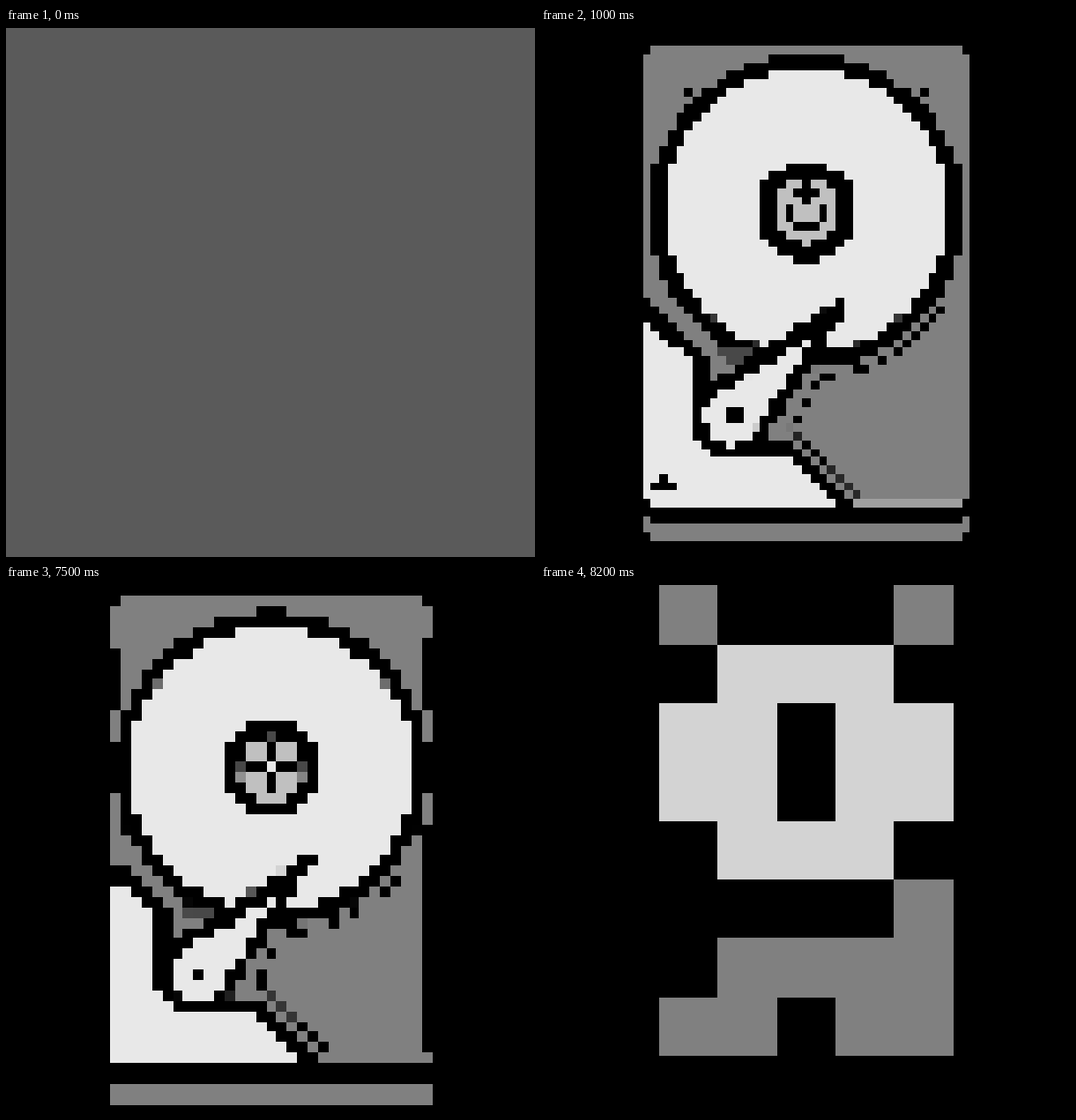
Animation of 600x600 px, one loop 8300 ms. Source, as an HTML page with a canvas:

```html
<!DOCTYPE html>
<html lang="en">
<head>
<meta charset="utf-8">
<title>Pixelated hard drive</title>
<style>
html, body { margin: 0; width: 100%; height: 100%; overflow: hidden; background: #000; }
canvas { display: block; width: 600px; height: 600px; }
</style>
</head>
<body>
<canvas id="stage" width="600" height="600"></canvas>
<script>
const SIZE = 600, SCALE = 4;
const CX = 300, CY = 207;
const GREY = '#808080';
const stage = document.getElementById('stage').getContext('2d');
const sceneCanvas = document.createElement('canvas');
sceneCanvas.width = sceneCanvas.height = SIZE * SCALE;
const scene = sceneCanvas.getContext('2d', { willReadFrequently: true });
scene.scale(SCALE, SCALE);

function rect(color, x, y, w, h) {
  scene.fillStyle = color;
  scene.fillRect(x, y, w, h);
}

const square = (color, x, y, size) => rect(color, x - size / 2, y - size / 2, size, size);

function plus(x, y, arm, width) {
  rect('#000', x - arm, y - width / 2, 2 * arm, width);
  rect('#000', x - width / 2, y - arm, width, 2 * arm);
}

function fill(color) {
  scene.fillStyle = color;
  scene.fill();
}

function stroke(width, join = 'miter') {
  scene.strokeStyle = '#000';
  scene.lineWidth = width;
  scene.lineJoin = join;
  scene.stroke();
}

function path(...points) {
  scene.beginPath();
  points.forEach(([x, y]) => scene.lineTo(x, y));
}

function disc(color, r) {
  scene.beginPath();
  scene.arc(CX, CY, r, 0, 2 * Math.PI);
  fill(color);
}

// Box with all four corners cut off
function cutBox(color, x0, y0, x1, y1, cut) {
  path([x0 + cut, y0], [x1 - cut, y0], [x1, y0 + cut], [x1, y1 - cut],
    [x1 - cut, y1], [x0 + cut, y1], [x0, y1 - cut], [x0, y0 + cut]);
  fill(color);
}

// Round pivot tapering to a point
function teardrop(color, r, tipX, tipY, outline = 0) {
  const x = 214, y = 442;
  const angle = Math.atan2(tipY - y, tipX - x);
  const open = Math.acos(r / Math.hypot(tipX - x, tipY - y));
  scene.beginPath();
  scene.arc(x, y, r, angle + open, angle - open + 2 * Math.PI);
  scene.lineTo(tipX, tipY);
  scene.closePath();
  if (outline) stroke(outline, 'round');
  fill(color);
}

// Recessed panel beside the disc: solid in coarse views, thin lines in fine ones
function drawPanel(n) {
  const solid = n < 36;
  const inset = solid ? 4 : 0;
  const right = 476 - 4 * inset, bottom = 532 - 5 * inset;
  path([right, 272 + 18 * inset], [right, bottom], [364 + 2.5 * inset, bottom],
    [284 + 7.5 * inset, 452], [312 + 7.5 * inset, 398]);
  scene.arc(CX, CY, 189 + 4 * inset, 1.48, 0.6, true);
  if (solid) return fill('#000');
  stroke(5);
  rect('#a0a0a0', 352, 537, 128, 5);
  rect('#000', 121.5, 72, 5, 72);
  rect('#000', 473.5, 64, 5, 80);
  path([122, 290], [206, 374]);
  stroke(3);
  for (const angle of [-Math.PI / 4, -3 * Math.PI / 4]) {
    scene.beginPath();
    scene.arc(CX, CY, 189, angle - 0.05, angle + 0.05);
    stroke(5);
  }
}

function drawHub(n, white, grow) {
  disc('#000', 57 + grow);
  disc(n > 21 ? '#c0c0c0' : '#929292', 37 - 2 * grow);
  if (n > 60) {
    plus(CX, 188, 12, 8);
    square('#000', CX - 20, 208, 16);
    square('#000', CX + 20, 208, 16);
    rect('#000', CX - 12, 216, 24, 16);
  } else if (n > 21) {
    plus(CX, CY, 28, 12);
    square(white, CX, CY, 12);
    for (const [dx, dy] of [[0, -1], [-1, 0], [1, 0]]) {
      square('#484848', CX + 39 * dx, CY + 39 * dy, 12);
    }
  }
}

function drawDrive(n) {
  const coarse = n < 15;
  const grow = Math.min(8, Math.max(0, (SIZE / n - 14) * 0.275)); // outlines thicken with the cells
  const white = coarse ? '#d3d3d3' : n < 75 ? '#e8e8e8' : '#eeeeee';

  rect('#000', 0, 0, SIZE, SIZE);
  cutBox(GREY, 112, 16, 488, 544, 17);
  if (!coarse) drawPanel(n);

  disc('#000', 178.8 + grow);
  disc(white, 160.6 - grow);
  drawHub(n, white, grow);
  path([200, 366], [238, 366], [222, 384]);
  fill('#484848');

  // Base plate
  path([112, 326], [168, 376], [168, 456], [200, 488], [280, 488],
    [336, 544], [126, 544], [112, 530]);
  scene.closePath();
  stroke(36 + 2 * grow);
  fill(coarse ? GREY : white);

  // Head and arm
  teardrop('#000', 38, 341, 313, 14 + 4 * grow);
  teardrop(coarse ? GREY : n < 36 ? '#c8c8c8' : white, 30 - grow, 310, 348);
  if (n > 21) {
    square('#000', 216, 440, 16);
    plus(140, 516, 12, 8);
  }

  // Strip below the body
  if (!coarse) {
    rect(GREY, 112, 552, 376, 24);
    rect(GREY, 120, 576, 360, 8);
    rect('#000', 120, 552, 360, 10);
  }
}

// Sample the scene at each cell centre and paint the cells
function showMosaic(n) {
  if (n < 9) rect('#5a5a5a', 0, 0, SIZE, SIZE);
  else drawDrive(n);
  const width = SIZE * SCALE;
  const pixels = scene.getImageData(0, 0, width, width).data;
  const centre = i => Math.floor((i + 0.5) * width / n);
  const edge = i => 2 * Math.ceil(SIZE / 2 * i / n - 1e-9);
  for (let row = 0; row < n; row++) {
    for (let col = 0; col < n; col++) {
      const at = 4 * (centre(row) * width + centre(col));
      stage.fillStyle = `rgb(${pixels[at]},${pixels[at + 1]},${pixels[at + 2]})`;
      stage.fillRect(edge(col), edge(row), edge(col + 1) - edge(col), edge(row + 1) - edge(row));
    }
  }
}

// Six more cells per side every 100 ms, a hold, then back again
function gridSize(time) {
  const step = Math.floor(time % 8300 / 100);
  return 3 + 6 * Math.min(step, 12, 83 - step);
}

let shown = 0;
function tick() {
  const n = gridSize(performance.now());
  if (n !== shown) showMosaic(shown = n);
  requestAnimationFrame(tick);
}
tick();
</script>
</body>
</html>
```
